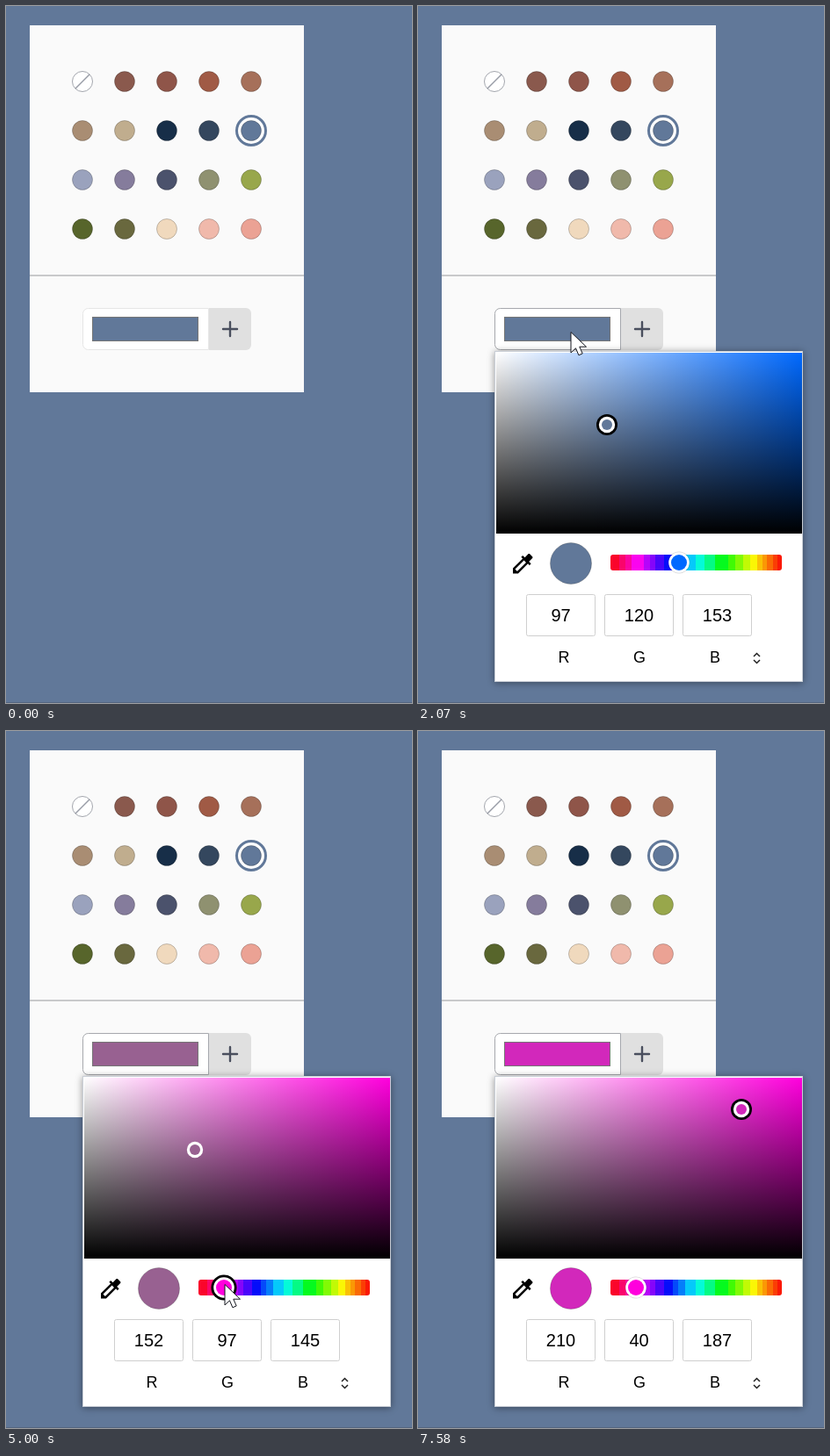
Animation of 462x794 px, one loop 8560 ms. Source, as an HTML page:

```html
<!DOCTYPE html>
<html lang="en">
<head>
<meta charset="utf-8">
<title>Colour picker</title>
<style>
  html, body { margin: 0; width: 100%; height: 100%; overflow: hidden; background: #617899; }
  #stage { position: relative; width: 462px; height: 794px; overflow: hidden; background: #617899; }
  svg { position: absolute; left: 0; top: 0; display: block; }
  #popup {
    position: absolute; box-sizing: border-box; left: 87px; top: 391px; width: 351px; height: 379px;
    box-shadow: 0 1px 8px rgba(0, 0, 0, .42);
  }
  #popup.open { top: 393px; height: 377px; background: #fff; border: 1px solid #c9ced6; }
  text { font-family: "Liberation Sans", Arial, sans-serif; text-anchor: middle; fill: #000; }
  .value { font-size: 20px; }
  .label { font-size: 18px; }
</style>
</head>
<body>
<div id="stage">
  <svg width="462" height="794">
    <rect y="793" width="462" height="1" fill="#53657f"/>
    <rect x="27" y="22" width="312" height="418" fill="#fafafa"/>
    <rect x="27" y="306" width="312" height="2" fill="#c8c9cb"/>
    <g id="swatches"></g>
    <circle cx="279" cy="142" r="16.5" fill="none" stroke="#617899" stroke-width="3"/>
    <path d="M231 344h42a6 6 0 0 1 6 6v36a6 6 0 0 1-6 6h-42z" fill="#e0e0e0"/>
    <path id="field" d="M230.5 344.5h-137a6 6 0 0 0-6 6v35a6 6 0 0 0 6 6h137z" fill="#fff"/>
    <rect id="chip" x="98.5" y="354.5" width="120" height="27" stroke="#767676"/>
    <path d="M247 368h16M255 360v16" stroke="#4a4f5e" stroke-width="2.4" stroke-linecap="round"/>
  </svg>

  <div id="popup"></div>

  <svg width="462" height="794">
    <defs>
      <linearGradient id="white">
        <stop stop-color="#fff"/><stop offset="1" stop-color="#fff" stop-opacity="0"/>
      </linearGradient>
      <linearGradient id="black" x2="0" y2="1">
        <stop stop-color="#000" stop-opacity="0"/><stop offset="1" stop-color="#000"/>
      </linearGradient>
      <clipPath id="barClip"><rect x="219" y="625" width="195" height="18" rx="3"/></clipPath>
    </defs>
    <g id="picker">
      <rect id="hue" x="89" y="395" width="348" height="206"/>
      <rect x="89" y="395" width="348" height="206" fill="url(#white)"/>
      <rect x="89" y="395" width="348" height="206" fill="url(#black)"/>
      <g id="shadeKnob">
        <circle class="focus" r="12"/><circle r="9.2" fill="#fff"/><circle class="dot" r="6"/>
      </g>
      <path transform="translate(104.25 620.25) scale(1.25)" d="M20.71 5.63l-2.34-2.34c-.39-.39-1.02-.39-1.41 0l-3.12 3.12-1.93-1.91-1.41 1.41 1.42 1.42L3 16.25V21h4.75l8.92-8.92 1.42 1.42 1.41-1.41-1.92-1.92 3.12-3.12c.4-.4.4-1.03.01-1.42zM6.92 19L5 17.08l8.06-8.06 1.92 1.92L6.92 19z"/>
      <circle id="preview" cx="174" cy="635" r="23.5" stroke="#000" stroke-opacity=".2"/>
      <g id="bar" clip-path="url(#barClip)"></g>
      <g id="hueKnob">
        <circle class="focus" r="14.6"/>
        <circle r="12.4" fill="#000" opacity=".16"/>
        <circle r="11.8" fill="#fff"/><circle class="dot" r="9"/>
      </g>
      <g id="inputs"></g>
      <path d="M382 741l3.500-3.500 3.500 3.500M382 745l3.500 3.500 3.500-3.500" fill="none" stroke="#222" stroke-width="1.5"/>
    </g>
    <circle id="click" r="18" fill="#ff0" opacity=".5"/>
    <path id="cursor" d="M0 .5V24l5.500-5.200 3.400 8 4.300-1.900-3.400-7.700h7.700z" fill="#fff" stroke="#15171f" stroke-linejoin="round"/>
  </svg>
</div>
<script>
const LOOP = 8560, STEP = 70;
const $ = id => document.getElementById(id);

function add(parent, tag, attrs, text = '') {
  const el = document.createElementNS('http://www.w3.org/2000/svg', tag);
  for (const key in attrs) el.setAttribute(key, attrs[key]);
  el.textContent = text;
  parent.append(el);
  return el;
}

// Palette
const palette = ('none 8a594d 8f5549 a05a45 a6705a a98d73 c0ad8e 172e48 34475e 617899 ' +
  '9aa2bd 857c9c 4b526c 8f9170 98a74b 57652b 69683e f0d9bd f0b9ab eba294').split(' ');
palette.forEach((color, i) => {
  const cx = 87 + i % 5 * 48, cy = 86 + Math.floor(i / 5) * 56;
  const empty = color === 'none';
  if (i === 9) add($('swatches'), 'circle', { cx, cy, r: 16, fill: '#fff' });
  add($('swatches'), 'circle', {
    cx, cy, r: 11.5, fill: empty ? '#fff' : '#' + color,
    stroke: empty ? '#a3a6ad' : '#000', 'stroke-opacity': empty ? 1 : .22
  });
  if (empty) add($('swatches'), 'path', { d: `M${cx - 8} ${cy + 8}l16-16`, stroke: '#989ca6', 'stroke-width': 1.4 });
});

// Hue bar in flat bands
const edges = [219, 229, 236, 243, 257, 264, 270, 280, 290, 296, 304, 316, 326, 338, 353, 361, 370, 378, 386, 392, 397, 404, 409, 414];
edges.slice(1).forEach((end, i) => {
  const x = edges[i], hue = 360 * (1 - ((x + end) / 2 - 219) / 195);
  add($('bar'), 'rect', { x, y: 625, width: end - x + .3, height: 18, fill: `hsl(${hue} 96% 50%)` });
});

// RGB inputs
const values = [...'RGB'].map((name, i) => {
  const x = 123 + i * 89;
  add($('inputs'), 'rect', { x: x + .5, y: 670.5, width: 78, height: 47, rx: 2, fill: '#fff', stroke: '#cfcfcf' });
  add($('inputs'), 'text', { class: 'label', x: 166 + i * 86, y: 748 }, name);
  return add($('inputs'), 'text', { class: 'value', x: x + 39.5, y: 701 });
});

// Picker states: start time, colour, pure hue, knob positions, focused knob
const states = [
  { at: 0, rgb: [97, 120, 153], hue: 'rgb(0,105,255)', shade: [215, 477], bar: 297, focus: 'shadeKnob' },
  { at: 5000, rgb: [152, 97, 145], hue: 'rgb(255,0,221)', shade: [215, 477], bar: 248, focus: 'hueKnob' },
  { at: 7040, rgb: [210, 40, 187], hue: 'rgb(255,0,221)', shade: [368, 431], bar: 248, focus: 'shadeKnob' }
];
const clicks = [[1870, 1940], [4930, 5000], [6910, 7040]];

// Cursor waypoints: time, x, y
const path = [
  [1250, 1, 330], [1390, 46, 341], [1600, 140, 364], [1810, 174, 371],
  [2680, 174, 371], [2820, 172, 378], [2960, 184, 420], [3170, 224, 512], [3380, 248, 581], [3590, 249, 622], [3660, 249, 627],
  [3790, 249, 627], [4000, 249, 630],
  [5340, 249, 630], [5480, 274, 590], [5620, 326, 500], [5760, 364, 437], [5830, 368, 430],
  [7370, 368, 430], [7440, 394, 434], [7510, 438, 446], [7580, 480, 458]
];

function cursorAt(t) {
  const i = path.findIndex(p => p[0] > t);
  if (i < 1) return null;
  const [t0, x0, y0] = path[i - 1], [t1, x1, y1] = path[i];
  const k = Math.floor((t - t0) / STEP) * STEP / (t1 - t0);
  return [x0 + (x1 - x0) * k, y0 + (y1 - y0) * k].map(Math.round);
}

const show = (el, on) => el.style.display = on ? '' : 'none';
const move = (el, [x, y]) => el.setAttribute('transform', `translate(${x} ${y})`);

function setKnob(id, pos, color, focus) {
  const knob = $(id);
  move(knob, pos);
  knob.querySelector('.dot').setAttribute('fill', color);
  show(knob.querySelector('.focus'), focus === id);
}

let current;
function applyState(s) {
  if (s === current) return;
  current = s;
  const color = `rgb(${s.rgb})`;
  $('chip').setAttribute('fill', color);
  $('preview').setAttribute('fill', color);
  $('hue').setAttribute('fill', s.hue);
  setKnob('shadeKnob', s.shade, color, s.focus);
  setKnob('hueKnob', [s.bar, 634], s.hue, s.focus);
  values.forEach((el, i) => el.textContent = s.rgb[i]);
}

function render(t) {
  applyState(states.findLast(s => s.at <= t));
  show($('popup'), t >= 1940);
  $('popup').className = t >= 2070 ? 'open' : '';
  show($('picker'), t >= 2070);
  $('field').setAttribute('stroke', t >= 1530 ? '#a6a8ad' : '#e6e6e6');
  const pos = cursorAt(t);
  show($('cursor'), pos);
  show($('click'), clicks.some(([from, to]) => t >= from && t < to));
  if (pos) {
    move($('cursor'), pos);
    move($('click'), pos);
  }
}

const start = performance.now();
function tick() {
  render((performance.now() - start) % LOOP);
  requestAnimationFrame(tick);
}
tick();
</script>
</body>
</html>
```
